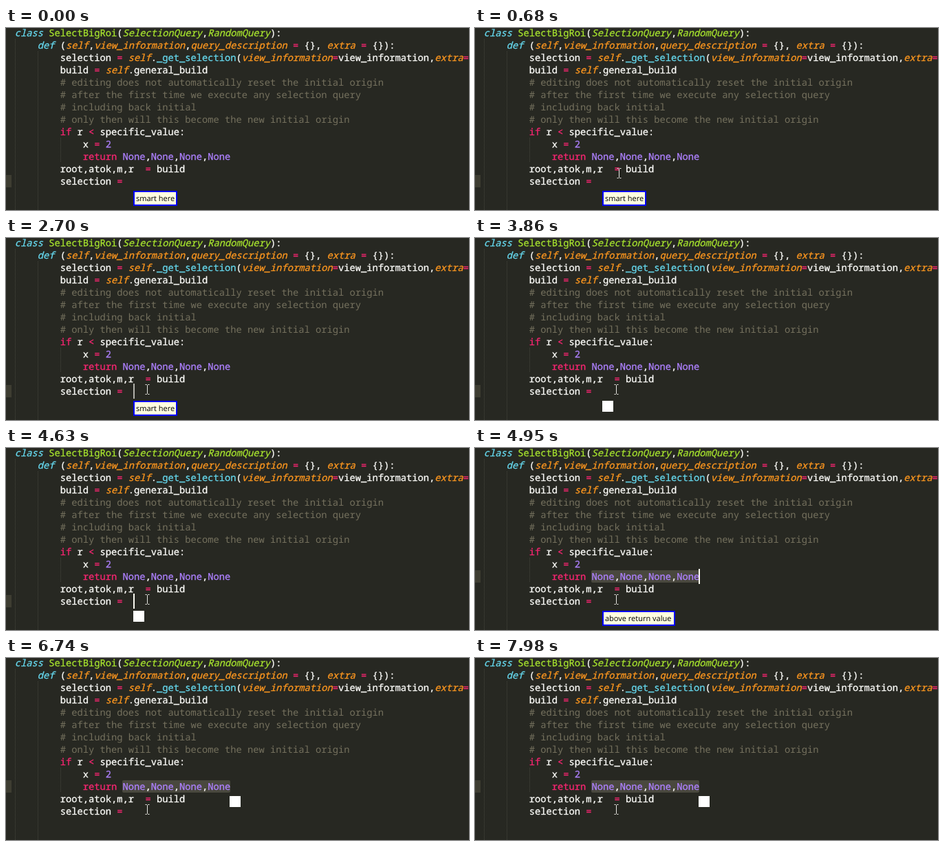
An HTML page for the animation above (8 s loop, 673 by 265 pixels).

```html
<!DOCTYPE html>
<html lang="en">
<head>
<meta charset="utf-8">
<title>Code editor with voice commands</title>
<style>
  html, body { margin: 0; width: 100%; height: 100%; overflow: hidden; background: #272822; }
  svg { display: block; width: 673px; height: 265px; }
  .code { font: 13.75px "Noto Sans Mono", "DejaVu Sans Mono", monospace; white-space: pre; text-rendering: geometricPrecision; }
  .code text { fill: currentColor; stroke: currentColor; stroke-width: 0.3px; }
  .tip { font: 11px "Open Sans", "Noto Sans", sans-serif; text-rendering: geometricPrecision; }
  .w { color: #fdfdfa; }
  .k { color: #f92672; }
  .c { color: #66d9ef; font-style: italic; }
  .f { color: #66d9ef; }
  .g { color: #a6e22e; font-style: italic; }
  .t { color: #a6e22e; }
  .o { color: #fd971f; font-style: italic; }
  .n { color: #ae81ff; }
  .code .r { color: #75715e; stroke: none; }
</style>
</head>
<body>
<svg viewBox="0 0 673 265" xmlns="http://www.w3.org/2000/svg">
  <rect width="673" height="265" fill="#272822"/>
  <rect id="gutter" width="8" height="18" fill="#3e3d32"/>
  <rect id="select" x="169" y="178" width="157" height="18" rx="2" fill="#49483e"/>
  <path d="M13.5 16V265M46.5 34V265M79.5 160V196" stroke="#45463d" stroke-dasharray="1 1"/>
  <g id="code" class="code"></g>
  <rect id="caret" width="2" height="22" fill="#f8f8f0"/>
  <g id="tip">
    <rect id="frame" x="1" y="1" height="20" fill="#ffffe1" stroke="#00f" stroke-width="2"/>
    <text id="label" class="tip" x="4" y="15" fill="#000"></text>
  </g>
  <rect id="badge" width="16" height="16" fill="#fff"/>
  <path id="pointer" d="M-3 -7H-1M1 -7H3M-1 -7L0 -6L1 -7M0 -6V6M-3 7H-1M1 7H3M-1 7L0 6L1 7" fill="none" stroke="#e8e8e4"/>
</svg>
<script>
const LOOP = 8000, LEFT = 12.7, CHAR = 8.25, ROW = 18;
const $ = id => document.getElementById(id);

// Indent level, then tokens: style letter followed by text
const lines = [
  [0, 'cclass|w |tSelectBigRoi|w(|gSelectionQuery|w,|gRandomQuery|w):'],
  [1, 'cdef|w (|oself|w,|oview_information|w,|oquery_description|w |k=|w {}, |oextra|w |k=|w {}):'],
  [2, 'wselection |k=|w |oself|w.|f_get_selection|w(|oview_information|k=|wview_information,|oextra|k='],
  [2, 'wbuild |k=|w |oself|w.general_build'],
  [2, 'r# editing does not automatically reset the initial origin'],
  [2, 'r# after the first time we execute any selection query'],
  [2, 'r# including back initial'],
  [2, 'r# only then will this become the new initial origin'],
  [2, 'kif|w r |k<|w specific_value:'],
  [3, 'wx |k=|w |n2'],
  [3, 'kreturn|w |nNone|w,|nNone|w,|nNone|w,|nNone'],
  [2, 'wroot,atok,m,r  |k=|w build'],
  [2, 'wselection |k=']
];

function drawCode() {
  lines.forEach(([level, source], row) => {
    let col = level * 4;
    for (const token of source.split('|')) {
      const body = token.slice(1), word = body.trimStart();
      const at = col + body.length - word.length;
      col += body.length;
      if (!word) continue;
      const el = document.createElementNS('http://www.w3.org/2000/svg', 'text');
      el.setAttribute('class', token[0]);
      el.setAttribute('x', LEFT + at * CHAR);
      el.setAttribute('y', 12 + row * ROW);
      el.textContent = word.trimEnd();
      $('code').append(el);
    }
  });
}

// Caret blinks: start of fade in, start of fade out
const blinks = [[1220, 1600], [2240, 2680], [3260, 3690], [4400, 5330], [5960, 6340], [7060, 7440]];

function caretAlpha(t) {
  const blink = blinks.find(([on, off]) => t >= on && t < off + 170);
  if (!blink) return 0;
  const [on, off] = blink;
  return t < off
    ? Math.min(1, (Math.floor((t - on) / 75) + 1) / 3)
    : 1 - (Math.floor((t - off) / 85) + 1) / 3;
}

// Pointer path: time, x, y
const path = [
  [70, 489, 252], [300, 380, 218], [520, 262, 203], [690, 205, 212],
  [830, 212, 216], [1140, 212, 216], [1290, 205, 220], [LOOP, 205, 220]
];

function pointerAt(t) {
  const tick = 70 + Math.floor((t - 70) / 76) * 76;
  const i = path.findIndex(p => p[0] > tick);
  const [t0, x0, y0] = path[i - 1], [t1, x1, y1] = path[i];
  const u = (tick - t0) / (t1 - t0);
  return [Math.round(x0 + (x1 - x0) * u) + 0.5, Math.round(y0 + (y1 - y0) * u) + 0.5];
}

const place = (el, x, y) => el.setAttribute('transform', `translate(${x} ${y})`);
const show = (el, on) => el.setAttribute('visibility', on ? 'visible' : 'hidden');

function setTip(text, width) {
  if ($('label').textContent === text) return;
  $('label').textContent = text;
  $('frame').setAttribute('width', width - 2);
}

function render(t) {
  const selected = t >= 4950, moved = t >= 6580;
  place($('gutter'), 0, selected ? 178 : 214);
  show($('select'), selected);

  place($('caret'), selected ? 325 : 185, selected ? 176 : 212);
  $('caret').setAttribute('opacity', caretAlpha(t));

  const listening = (t >= 3860 && t < 4720) || t >= 6740;
  const popup = [moved ? 325 : 185, moved ? 201 : 237];
  if (t < 4720) setTip('smart here', 64);
  else setTip('above return value', 106);
  place($('tip'), ...popup);
  show($('tip'), !listening);
  place($('badge'), ...popup);
  show($('badge'), listening);

  show($('pointer'), t >= 70);
  if (t >= 70) place($('pointer'), ...pointerAt(t));
}

drawCode();
render(0);
const start = performance.now();
function loop() {
  render((performance.now() - start) % LOOP);
  requestAnimationFrame(loop);
}
requestAnimationFrame(loop);
</script>
</body>
</html>
```
